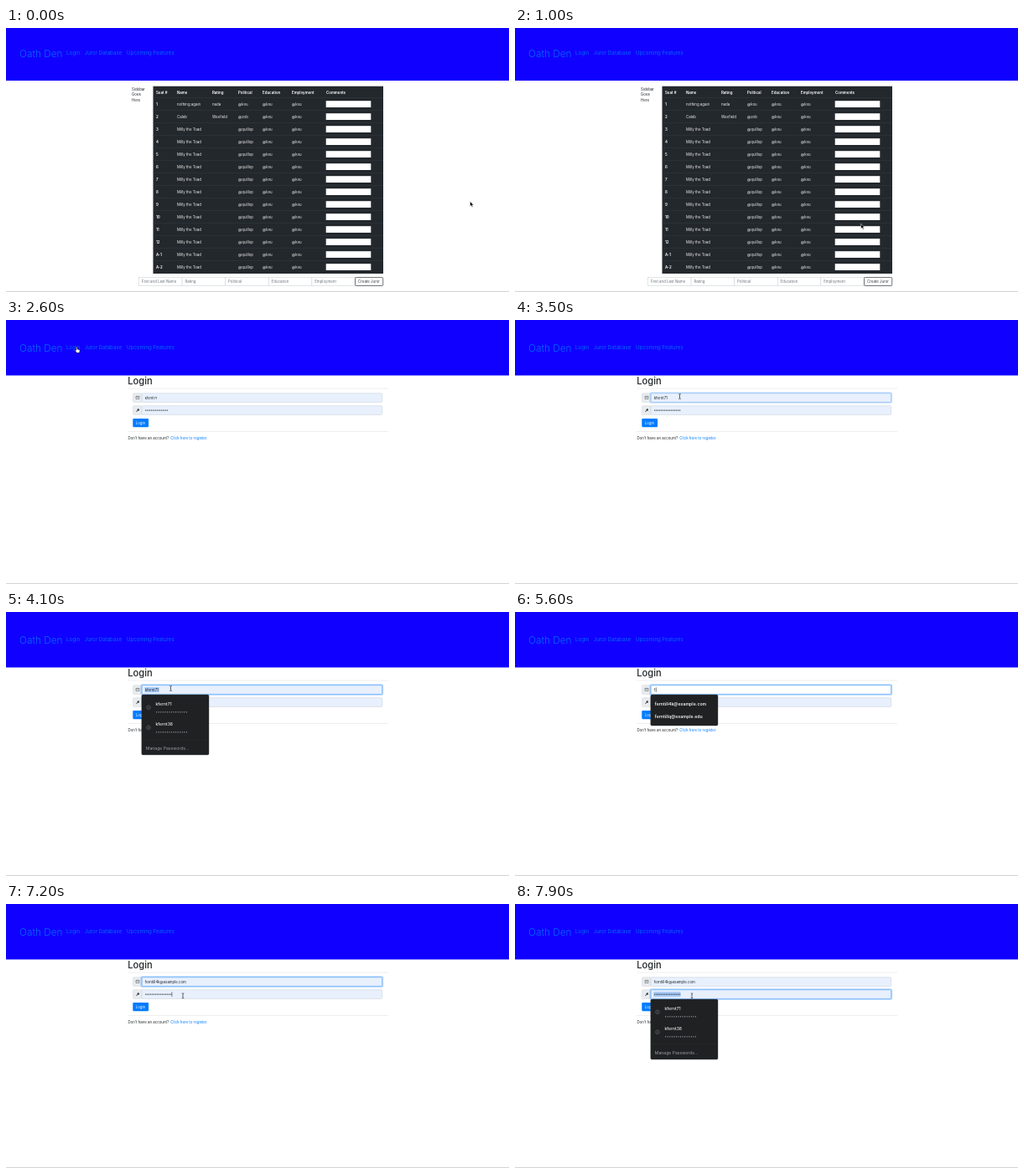
An HTML page for the animation above (8000 ms loop, 600x316 px).

```html
<!DOCTYPE html>
<html lang="en">
<head>
<meta charset="utf-8">
<title>Juror table and login</title>
<style>
  html, body { margin: 0; width: 100%; height: 100%; overflow: hidden; background: #fff; }
  svg { display: block; width: 100vw; height: 100vh; font: 4.4px Inter, "Open Sans", sans-serif; }
  text { white-space: pre; }
  .bold { font-weight: 600; }
  .ring { fill: none; stroke: #80bdff; stroke-width: .8; }
  .glow { fill: none; stroke: #007bff; stroke-opacity: .25; stroke-width: 2; }
</style>
</head>
<body>
<svg id="stage" viewBox="0 0 600 316"></svg>
<script>
const LOOP = 8000, TICK = 100;
const INK = '#212529', LINK = '#007bff', AUTOFILL = '#e8f0fe';
const USERS = ['kfernt71', 'kfernt38'];
const EMAILS = ['ferntill4k@example.com', 'ferntillq@example.edu'];

const text = (x, y, content, fill = INK, extra = '') =>
  `<text x="${x}" y="${y}" fill="${fill}" ${extra}>${content}</text>`;
const rect = (x, y, w, h, fill, extra = '') =>
  `<rect x="${x}" y="${y}" width="${w}" height="${h}" fill="${fill}" ${extra}/>`;
const line = (x, y, w, stroke, width = .5) =>
  `<path d="M${x} ${y}h${w}" stroke="${stroke}" stroke-width="${width}"/>`;
const group = (id, ...parts) => `<g id="${id}">${parts.join('')}</g>`;
const dots = (id, x, y, step, size, stroke, count = 16) =>
  `<path id="${id}" d="M${x} ${y}h${(count - 1) * step + .01}" stroke="${stroke}" stroke-width="${size}"
    stroke-linecap="round" stroke-dasharray="0 ${step}"/>`;

function tablePage() {
  const columns = [179, 204, 246, 277, 306, 341, 382];
  const titles = ['Seat #', 'Name', 'Rating', 'Political', 'Education', 'Employment', 'Comments'];
  const special = [['nothing again', 'nada', '@kvu'], ['Caleb', 'Wexfield', '@zob']];
  const parts = ['Sidebar', 'Goes', 'Here'].map((word, i) => text(150, 74.6 + i * 6.8, word));
  parts.push(rect(175.5, 69.7, 274.5, 224.3, '#23282d'));
  titles.forEach((title, i) => parts.push(text(columns[i], 78.6, title, '#fff', 'class="bold"')));
  for (let i = 0; i < 14; i++) {
    const y = 91 + i * 15;
    const [name, rating, party] = special[i] || ['Milly the Toad', '', '@quillop'];
    parts.push(line(175.5, y - 7.5, 274.5, '#343a40'));
    parts.push(text(columns[0], y + 1.6, i < 12 ? i + 1 : 'A-' + (i - 11), '#fff', 'class="bold"'));
    [name, rating, party, '@kvu', '@kvu'].forEach((value, k) =>
      parts.push(text(columns[k + 1], y + 1.6, value, '#eee')));
    parts.push(rect(381.7, y - 3.8, 53.6, 7.8, '#fff'));
  }
  ['First and Last Name', 'Rating', 'Political', 'Education', 'Employment'].forEach((label, i) => {
    const x = 158.5 + i * 51.6;
    parts.push(rect(x, 298.5, 51.6, 10, '#fff', 'stroke="#ced4da" stroke-width=".6"'));
    parts.push(text(x + 3.3, 305, label, '#6c757d'));
  });
  parts.push(rect(416.5, 298.5, 33.2, 10, '#fff', 'rx="1" stroke="#343a40" stroke-width=".7"'));
  parts.push(text(420, 305, 'Create Juror', '#343a40'));
  return group('table', ...parts);
}

function field(id, y, icon) {
  return rect(151.5, y, 10.5, 10.7, '#e9ecef', 'rx="1" stroke="#ced4da" stroke-width=".5"') + icon +
    rect(162, y, 286.7, 10.7, AUTOFILL, `id="${id}Box" rx="1" stroke="#ced4da" stroke-width=".6"`) +
    group(id + 'Ring',
      rect(161.4, y - .6, 287.9, 11.9, 'none', 'class="glow" rx="1.5"'),
      rect(162, y, 286.7, 10.7, 'none', 'class="ring" rx="1"'));
}

function loginPage() {
  const envelope = '<path d="M155 91.3h4v3.2h-4zl2 1.7 2-1.7" fill="none" stroke="#495057" stroke-width=".5"/>';
  const key = '<circle cx="157.8" cy="107.5" r="1.2" fill="#343a40"/><path d="M157.3 108l-2 2" stroke="#343a40" stroke-width=".9"/>';
  return group('login',
    text(145.3, 77.3, 'Login', INK, 'font-size="11.1" font-weight="500"'),
    line(145.3, 82, 310.5, '#dcdcdc'),
    field('user', 87.7, envelope),
    field('pass', 102.7, key),
    rect(165.5, 90, 17.2, 6.2, '#a9cbf7', 'id="userSelection"'),
    rect(165.3, 105, 32.2, 6.2, '#a9cbf7', 'id="passSelection"'),
    text(165.7, 94.7, '', INK, 'id="userText"'),
    dots('shortDots', 166.5, 108.1, 1.73, 1.25, INK),
    dots('longDots', 166.7, 108.1, 2, 1.45, INK),
    rect(0, 0, .5, 5.6, '#000', 'id="caret"'),
    rect(151.3, 118, 18.8, 10.2, LINK, 'rx="1.1"'),
    text(154.7, 124.7, 'Login', '#fff'),
    line(145.3, 133.5, 310.5, '#dcdcdc'),
    text(145.4, 143.2, "Don't have an account?"),
    text(196.3, 143.2, 'Click here to register.', LINK));
}

function dropdowns() {
  const panel = height => rect(161.8, 99, 80.2, height, '#1f2123', 'rx="1.6" stroke="#3a3c3e" stroke-width=".4"');
  const accounts = USERS.map((name, i) => {
    const y = 110 + i * 24;
    return `<circle cx="170" cy="${y + 4.3}" r="2.4" fill="none" stroke="#5f6368" stroke-width=".6"/>
      <path d="M167.6 ${y + 4.3}h4.8m-2.4-2.4v4.8" stroke="#5f6368" stroke-width=".4"/>` +
      text(178.5, y + 1.8, name, '#eee', 'font-size="5" font-weight="500"') +
      dots('', 179.7, y + 9.8, 2.55, 1.3, '#b5b8bb', 15);
  });
  return group('accounts', panel(72), ...accounts, line(162, 153, 79.8, '#323437', .4),
      text(166.8, 164.8, 'Manage Passwords...', '#9aa0a6', 'font-size="5.1"')) +
    group('emails', panel(37), rect(162, 102.5, 79.8, 14.5, '#3c4043', 'id="emailHover"'),
      ...EMAILS.map((mail, i) => text(166.8, 111.8 + i * 15, mail, '#eee', 'font-size="5.2" class="bold"')));
}

function cursors() {
  const outline = 'stroke="#fff" stroke-width=".5" stroke-linejoin="round"';
  return group('cursor',
    `<path id="arrow" d="M0 0v6l1.4-1.2 1 2.3 1-.5-1-2.2h1.9z" fill="#000" ${outline}/>`,
    `<path id="hand" d="M-.7 0q.7-.7 1.2 0v2.4l2.5.6q.7.3.6 1.2l-.5 2.6h-3.2l-2.1-2.7q0-1 1.5-.3z"
      fill="#fff" stroke="#000" stroke-width=".55"/>`,
    '<path id="beam" d="M-1.2-3q1 0 1.2.6.2-.6 1.2-.6M0-2.4v4.8m-1.2.6q1 0 1.2-.6.2.6 1.2.6" fill="none" stroke="#111" stroke-width=".65"/>');
}

const stage = document.getElementById('stage');
const navColor = '#0568fa';
stage.innerHTML =
  rect(0, 0, 600, 316, '#fff') +
  rect(0, 0, 600, 63, '#1000ff', 'id="header"') +
  group('nav',
    text(16, 34.5, 'Oath Den', navColor, 'font-size="11.8" font-weight="300"'),
    text(72, 32.2, 'Login', navColor, 'id="loginLink" font-size="6.15"'),
    text(93.7, 32.2, 'Juror Database', navColor, 'font-size="6.15"'),
    text(144, 32.2, 'Upcoming Features', navColor, 'font-size="6.15"')) +
  tablePage() + loginPage() + dropdowns() +
  line(0, 315.5, 600, '#c8c8c8', .8) + cursors();

const $ = id => document.getElementById(id);
const show = (id, visible) => $(id).setAttribute('visibility', visible ? 'inherit' : 'hidden');
const set = (id, name, value) => $(id).setAttribute(name, value);
const clamp = v => Math.max(0, Math.min(1, v));

// time, x, y
const path = [
  [0, 553.5, 207.5], [200, 442, 246], [400, 442, 246], [800, 415, 232], [900, 415, 232],
  [1800, 347, 298], [2200, 83.5, 31.5], [2600, 84.5, 32.5], [3400, 196.5, 91.5],
  [6400, 196.5, 91.5], [7100, 211, 109.8], [8000, 211, 109.8]
];

function pointer(t) {
  const next = path.findIndex(p => p[0] > t);
  const [t0, x0, y0] = path[next - 1], [t1, x1, y1] = path[next];
  const u = (t - t0) / (t1 - t0), eased = u * u * (3 - 2 * u);
  return [x0 + (x1 - x0) * eased, y0 + (y1 - y0) * eased];
}

function userValue(t) {
  if (t < 4600) return USERS[0];
  if (t < 5600) return '';
  return t < 5900 ? EMAILS[0][0] : EMAILS[0];
}

function draw(t) {
  const between = (from, to) => t >= from && t < to;
  const onLogin = t >= 2600;
  show('table', !onLogin);
  show('login', onLogin);
  set('header', 'height', onLogin ? 66.4 : 63);
  set('nav', 'transform', `translate(0 ${onLogin ? 3.3 : 0})`);
  set('loginLink', 'fill', between(2100, 2600) ? '#0a3cd8' : navColor);

  const passFocus = clamp((t - 7200) / 150);
  set('userRing', 'opacity', clamp((t - 3400) / 150) * (1 - passFocus));
  set('passRing', 'opacity', passFocus);
  set('userBox', 'fill', between(4600, 5900) ? '#fff' : AUTOFILL);
  $('userText').textContent = userValue(t);
  set('userText', 'font-size', t < 3500 ? 3.9 : 4.3);
  show('userSelection', between(3900, 4600));
  show('passSelection', t >= 7400);
  show('shortDots', onLogin && t < 3500);
  show('longDots', t >= 3500);

  const caretX = t < 5600 ? 165.7 : t < 7200 ? 167.9 : 197.7;
  show('caret', between(4600, 5100) || between(5600, 5900) || between(7200, 7400));
  set('caret', 'transform', `translate(${caretX} ${t < 7200 ? 90.3 : 105.3})`);

  show('accounts', between(3600, 5600) || t >= 7400);
  set('accounts', 'transform', `translate(0 ${t < 7200 ? 0 : 15})`);
  show('emails', between(5600, 6400));
  show('emailHover', between(5900, 6400));

  const [x, y] = pointer(t);
  const overLink = between(2100, 2800);
  const overField = onLogin && x > 162 && y > 87;
  set('cursor', 'transform', `translate(${x} ${y})`);
  show('cursor', !between(4600, 6400));
  show('hand', overLink);
  show('beam', overField);
  show('arrow', !overLink && !overField);
}

const start = performance.now();
function frame() {
  const elapsed = (performance.now() - start) % LOOP;
  draw(Math.floor(elapsed / TICK) * TICK);
  requestAnimationFrame(frame);
}
frame();
</script>
</body>
</html>
```
